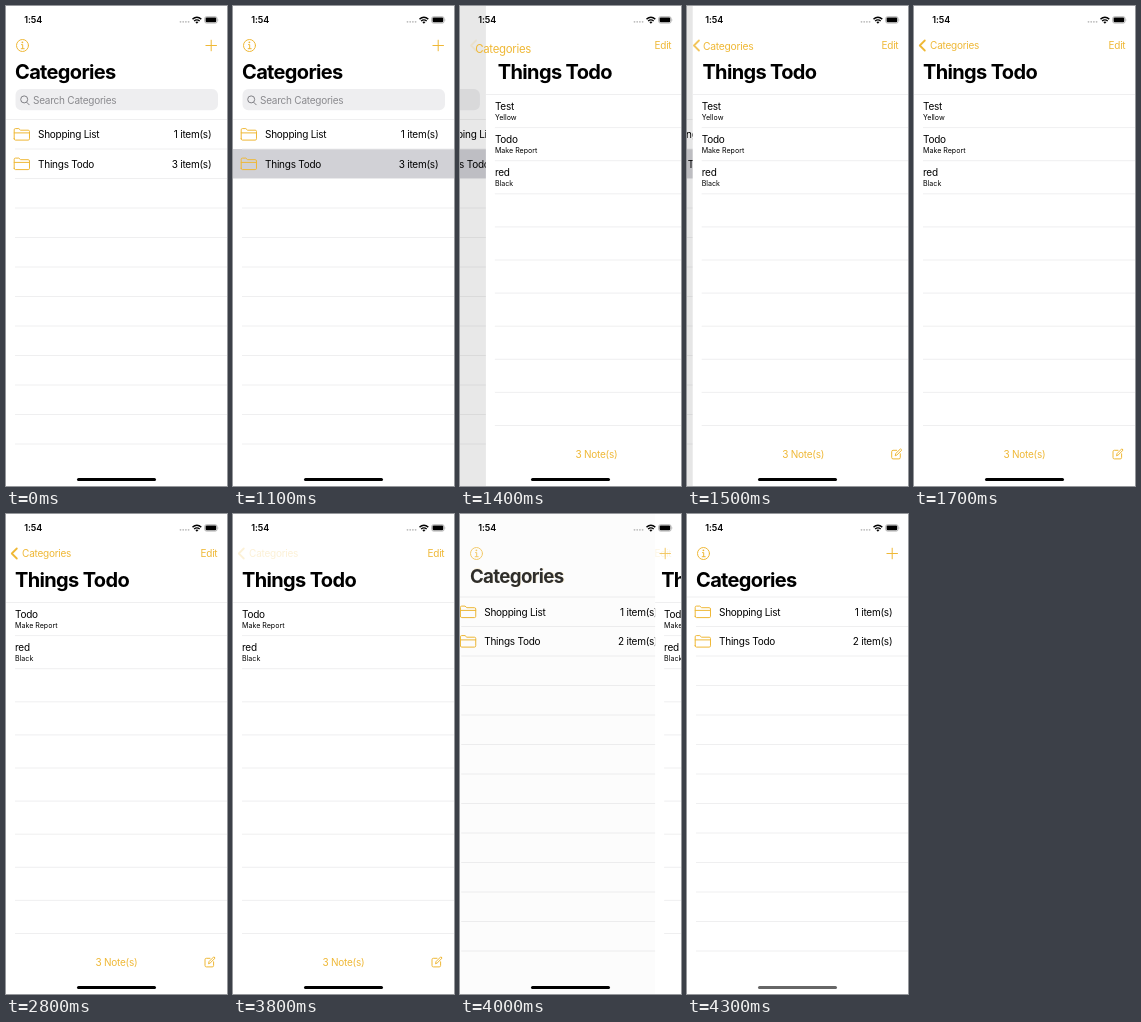
Animation of 221x480 px, one loop 4.4 s. Source, as an HTML page:

```html
<!DOCTYPE html>
<html lang="en">
<head>
<meta charset="utf-8">
<title>Categories</title>
<style>
  html, body { margin: 0; width: 100%; height: 100%; overflow: hidden; background: #fff; }
  svg { display: block; width: 100%; height: 100%; font: 10px Inter, "Liberation Sans", sans-serif; letter-spacing: -.24px; }
  .small { font-size: 7.1px; letter-spacing: 0; }
  .title { font-size: 20px; font-weight: 700; letter-spacing: -.65px; }
  .clock { font-size: 9px; font-weight: 600; letter-spacing: -.1px; }
  .tint { fill: #efb836; }
  .icon { fill: none; stroke: #efb836; stroke-linecap: round; stroke-linejoin: round; }
  .line { stroke: #ebebed; stroke-width: .8; }
  .end { text-anchor: end; }
  .mid { text-anchor: middle; }
</style>
</head>
<body>
<svg viewBox="0 0 221 480">
  <g id="list">
    <rect width="221" height="480" fill="#fff"/>
    <g id="table"></g>
  </g>
  <g id="search">
    <rect x="9.5" y="83" width="202.5" height="21.3" rx="5.8" fill="rgba(118,118,128,.12)"/>
    <path d="M20.8 96.4l2.4 2.4" stroke="#808085" stroke-linecap="round"/>
    <circle cx="18.2" cy="93.4" r="3.5" fill="none" stroke="#808085"/>
    <text x="27" y="97.5" fill="#8a8a8e">Search Categories</text>
  </g>
  <rect id="dim" width="221" height="480"/>

  <g id="detail">
    <rect width="221" height="480" fill="#fff"/>
    <g id="notes"></g>
    <g id="swipe">
      <rect x="82.5" y="89" width="138.5" height="32.6" fill="#808080"/>
      <g fill="none" stroke="#fff" stroke-width="1.2" stroke-linecap="round" stroke-linejoin="round">
        <path d="M164.5 100h11M168 99.6v-1.7h4v1.7"/>
        <path d="M165.7 100.5l.7 10.2h7.2l.7-10.2M168.3 102.5l.2 6M170 102.5v6M171.7 102.5l-.2 6"/>
      </g>
    </g>
    <text class="tint mid" x="110.5" y="451.6">3 Note(s)</text>
    <path class="icon" d="M204 444.3h-3.6q-1.4 0-1.4 1.4v5.8q0 1.4 1.4 1.4h5.8q1.4 0 1.4-1.4v-3.7M202.6 449.4l.5-1.9 4.7-4.7 1.3 1.3-4.7 4.7z"/>
  </g>

  <g id="listButtons">
    <g class="icon">
      <circle cx="16.5" cy="39.5" r="6"/>
      <path d="M15.5 38.6h1.2v4M15.2 42.7h3M199.9 39.5h10.6M205.2 34.2v10.6"/>
    </g>
    <circle class="tint" cx="16.4" cy="36.3" r=".9"/>
  </g>
  <path id="chevron" class="icon" stroke-width="1.8" d="M10.8 34.5l-5 5 5 5"/>
  <text id="back" class="tint">Categories</text>
  <text id="heading" class="title">Categories</text>
  <text id="edit" class="tint end" x="211.4" y="42.8">Edit</text>
  <text id="noteTitle" class="title" y="73.3">Things Todo</text>

  <text class="clock" x="18.3" y="17.2">1:54</text>
  <g fill="#bbb">
    <circle cx="174.5" cy="15.8" r=".9"/><circle cx="177.2" cy="15.8" r=".9"/>
    <circle cx="179.9" cy="15.8" r=".9"/><circle cx="182.6" cy="15.8" r=".9"/>
  </g>
  <g fill="none" stroke="#000" stroke-width="1.4">
    <path d="M186.5 13.1q4.4-3.6 8.8 0M188.1 15q2.8-2.2 5.6 0"/>
  </g>
  <path d="M189.3 16.1q1.6-1 3.2 0l-1.6 1.6z"/>
  <rect x="198.7" y="10.7" width="12.4" height="6.4" rx="1.8" fill="none" stroke="#888" stroke-width=".6"/>
  <rect x="199.6" y="11.6" width="10.6" height="4.6" rx="1"/>
  <path d="M211.8 12.9q1.2 1 0 2z" fill="#888"/>
  <rect id="home" x="71" y="472" width="79" height="3" rx="1.5"/>
</svg>
<script>
const LOOP = 4400, STEP = 100, WIDTH = 221, INSET = 9;
const ROW = 29.5, NOTE = 33.1, NOTES_TOP = 88.5;
const el = id => document.getElementById(id);
const clamp = v => Math.max(0, Math.min(1, v));
const line = (y, x) => `<path class="line" d="M${x} ${y}H${WIDTH}"/>`;
const lines = (top, gap, count) =>
  Array.from({ length: count }, (_, i) => line(top + i * gap, i ? INSET : 0)).join('');

const categoryRow = (name, count, y) => `<g transform="translate(0 ${y})">
  <path class="icon" d="M8.2 19.3v-9q0-1.2 1.2-1.2h3.4l1.8 1.6h7.6q1.3 0 1.3 1.3v7.3q0 1.3-1.3 1.3h-12.7q-1.3 0-1.3-1.3zM8.2 13.4h15.3"/>
  <text x="32" y="18.5">${name}</text>
  <text class="end" x="205.3" y="18.5">${count} item(s)</text></g>`;

const noteRow = ([name, detail], i) => `<g transform="translate(${INSET} ${NOTES_TOP + i * NOTE})">
  <text y="15.3">${name}</text><text class="small" y="25.6">${detail}</text></g>`;

const notes = [['Test', 'Yellow'], ['Todo', 'Make Report'], ['red', 'Black']];

function drawTable(top, count, pressed) {
  el('table').innerHTML =
    (pressed ? `<rect y="${top + ROW}" width="${WIDTH}" height="${ROW}" fill="#d1d1d6"/>` : '') +
    lines(top, ROW, top > 100 ? 12 : 13) +
    categoryRow('Shopping List', 1, top) + categoryRow('Things Todo', count, top + ROW);
}

function drawNotes(swiping, deleted) {
  const rows = deleted ? notes.slice(1).map(noteRow)
    : notes.map((note, i) => swiping && !i ? '' : noteRow(note, i));
  el('notes').innerHTML = lines(NOTES_TOP, NOTE, 11) + rows.join('');
  el('swipe').setAttribute('visibility', swiping ? 'visible' : 'hidden');
}

// Critically damped spring: the distance still to go after some seconds.
function remaining(seconds) {
  const x = 18.45 * Math.max(0, seconds);
  return (1 + x) * Math.exp(-x);
}

// 1 = category list on screen, 0 = notes on screen.
function pageOffset(ms, lag) {
  if (ms < 1300 || ms >= 4300) return 1;
  if (ms < 1700) return remaining((ms - 1200) / 1000 - lag);
  if (ms <= 3800) return 0;
  return 1 - remaining((ms - 3800) / 1000 - lag);
}

const move = (id, x, y = 0, scale = 1) =>
  el(id).setAttribute('transform', `translate(${x} ${y}) scale(${scale})`);
const fade = (id, opacity) => el(id).setAttribute('opacity', clamp(opacity));

function render(ms) {
  const page = pageOffset(ms, 0), nav = pageOffset(ms, .0075);
  const deleted = ms >= 2800, pressedBack = ms === 3800;

  drawTable(deleted ? 83 : 113.5, deleted ? 2 : 3, ms >= 1100 && !deleted);
  drawNotes(ms === 2700, deleted);

  move('list', -.3 * WIDTH * (1 - page));
  move('search', -WIDTH * (1 - nav));
  fade('search', deleted ? 0 : 1);
  fade('dim', .1 * (1 - page));
  move('detail', WIDTH * page);

  // The large heading shrinks into the back button.
  const x = 16.1 - 7.1 * nav, y = 42.8 + 30.5 * nav, width = 49 + 53 * nav;
  move('back', x, y, width / 49);
  move('heading', x, y, width / 102);
  move('chevron', 40 * nav);
  fade('back', pressedBack ? .2 : 1.3 * (1 - nav));
  fade('heading', (nav - .3) / .7);
  fade('chevron', pressedBack ? .2 : 1 - 6.5 * nav);
  fade('listButtons', 2 * nav - 1);
  fade('edit', page < .2 ? 1 : 1 - nav);
  move('noteTitle', INSET + WIDTH * nav);
  el('home').setAttribute('fill', ms >= 4300 ? '#666' : '#000');
}

let shown = -1;
function tick() {
  const ms = Math.floor(performance.now() % LOOP / STEP) * STEP;
  if (ms !== shown) render(shown = ms);
  requestAnimationFrame(tick);
}
tick();
</script>
</body>
</html>
```
